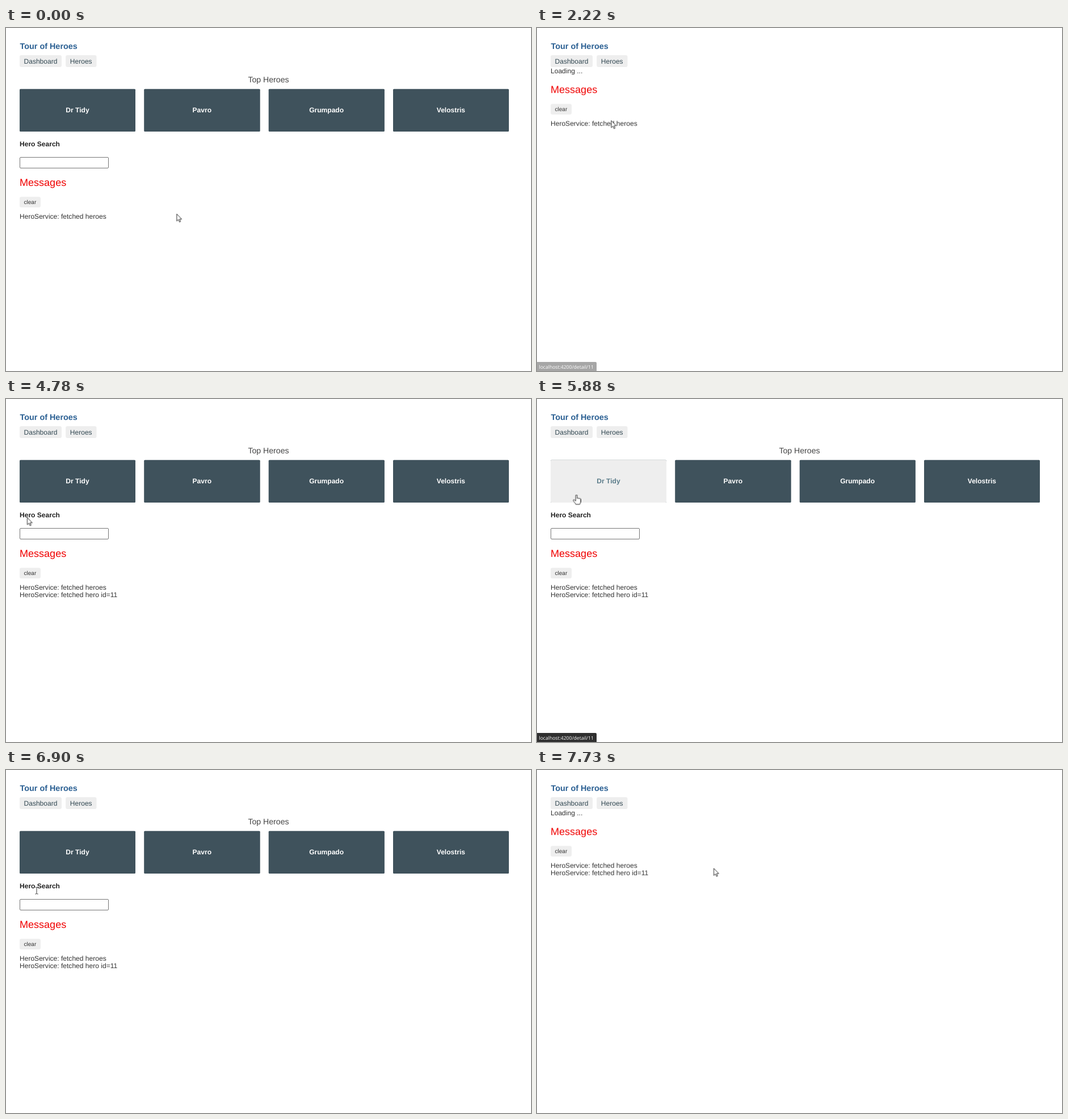
Animation, 925 px wide and 606 px high, one loop 8000 ms. Source, as an HTML page:

```html
<!DOCTYPE html>
<html lang="en">
<head>
<meta charset="utf-8">
<title>Tour of Heroes</title>
<style>
  html, body { margin: 0; width: 100%; height: 100%; overflow: hidden; background: #fff; }
  svg { display: block; width: 925px; height: 606px; }
  text { font: 12.05px "Liberation Sans", Arial, sans-serif; fill: #333; text-rendering: geometricPrecision; }
  .title { font-size: 14.4px; font-weight: bold; fill: #2b6093; }
  .nav text { fill: #334953; }
  .button { fill: #eee; }
  .small { font-size: 10.05px; }
  .bold { font-weight: bold; fill: #222; }
  .top { font-size: 14.1px; fill: #444; }
  .head { font-size: 18.05px; fill: #444; }
  .red { fill: #f00000; }
  .field { fill: #fff; stroke: #767676; }
  .cards { fill: #3f525c; }
  .cards text { font-weight: bold; fill: #fff; text-anchor: middle; }
  .cards .lit rect { fill: #eee; }
  .cards .lit text, .label { font-weight: bold; fill: #5b7c8a; }
  .status rect { fill: #2f2f2f; }
  .status text { font: 8.6px "Open Sans", "Noto Sans", sans-serif; fill: #fff; }
  .cursor path { fill: #fff; stroke: #111; stroke-width: .9; stroke-linejoin: round; }
  .cursor .beam { fill: none; stroke: #222; }

  /* Hard switches */
  .dash, .detail, .loading, .msgs, .second-msg, .first, .second, .arrow, .hand, .beam {
    animation: 8s step-end infinite;
  }
  .dash { animation-name: dash; }
  .detail { animation-name: detail; }
  .loading { animation-name: loading; }
  .msgs { animation-name: msgs; }
  .second-msg { animation-name: second-msg; }
  .first { animation-name: first; }
  .second { animation-name: second; }
  .arrow { animation-name: arrow; }
  .hand { animation-name: hand; }
  .beam { animation-name: beam; }

  /* Continuous motion */
  .status { animation: status 8s linear infinite; }
  .cursor { animation: cursor 8s ease-in-out infinite; }

  @keyframes dash {
    0%, 59.25%, 85.75% { opacity: 1; }
    22.75%, 74%, 93.75% { opacity: 0; }
  }
  @keyframes detail {
    0%, 59.25%, 85.75% { opacity: 0; }
    47.625%, 74% { opacity: 1; }
  }
  @keyframes loading {
    0%, 47.625% { opacity: 0; }
    22.75%, 93.75% { opacity: 1; }
  }
  @keyframes msgs {
    0%, 59.25%, 85.75% { transform: translateY(0); }
    22.75%, 93.75% { transform: translateY(-164.2px); }
    47.625%, 74% { transform: translateY(-24.8px); }
  }
  @keyframes second-msg {
    0% { opacity: 0; }
    47.625% { opacity: 1; }
  }
  @keyframes first {
    0%, 40%, 80% { opacity: 0; }
    14.3%, 67.55% { opacity: 1; }
  }
  @keyframes second {
    0% { opacity: 0; }
    91% { opacity: 1; }
  }
  @keyframes arrow {
    0%, 23.25%, 53.95%, 59.75%, 66.25%, 81.6%, 88.7%, 94.25% { opacity: 1; }
    14.3%, 47.625%, 55.1%, 64.6%, 67.55%, 82.9%, 91% { opacity: 0; }
  }
  @keyframes hand {
    0%, 23.25%, 59.75%, 74%, 85.75%, 94.25% { opacity: 0; }
    14.3%, 55.1%, 67.55%, 82.9%, 91% { opacity: 1; }
  }
  @keyframes beam {
    0%, 53.95%, 66.25%, 81.6%, 88.7% { opacity: 0; }
    47.625%, 64.6%, 74%, 85.75% { opacity: 1; }
  }
  @keyframes status {
    0%, 14.6%, 28.625%, 67.8%, 79.875%, 91.4%, 96.5%, 100% { opacity: 0; }
    16.25%, 26.625%, 69.7%, 77.875%, 92.6%, 95% { opacity: 1; }
  }
  @keyframes cursor {
    0%, 8.875% { transform: translate(300.8px, 328.5px); }
    16.25%, 52.125% { transform: translate(130.8px, 163.5px); }
    56.125%, 64.375% { transform: translate(37.5px, 209.5px); }
    69.75%, 79.875% { transform: translate(69.5px, 169.5px); }
    84.375%, 87.125% { transform: translate(54px, 213px); }
    93%, 100% { transform: translate(311.5px, 173.7px); }
  }
</style>
</head>
<body>
<svg viewBox="0 0 925 606">
  <text class="title" x="24.5" y="37">Tour of Heroes</text>
  <g class="nav">
    <rect class="button" x="24" y="48" width="74" height="21" rx="3"/>
    <rect class="button" x="105.2" y="48" width="54.3" height="21" rx="3"/>
    <text x="31.5" y="62.5">Dashboard</text>
    <text x="112.8" y="62.5">Heroes</text>
  </g>

  <g class="dash">
    <text class="top" x="462.5" y="96" text-anchor="middle">Top Heroes</text>
    <g class="cards">
      <rect x="24" y="107.8" width="204" height="75.2" rx="1.5"/>
      <rect x="243.2" y="107.8" width="204.5" height="75.2" rx="1.5"/>
      <rect x="462.7" y="107.8" width="204.2" height="75.2" rx="1.5"/>
      <rect x="682" y="107.8" width="204" height="75.2" rx="1.5"/>
      <text x="126" y="149">Dr Tidy</text>
      <text x="345.3" y="149">Pavro</text>
      <text x="564.6" y="149">Grumpado</text>
      <text x="783.9" y="149">Velostris</text>
      <g class="lit first">
        <rect x="24" y="107.8" width="204" height="75.2" rx="1.5"/>
        <text x="126" y="149">Dr Tidy</text>
      </g>
      <g class="lit second">
        <rect x="243.2" y="107.8" width="204.5" height="75.2" rx="1.5"/>
        <text x="345.3" y="149">Pavro</text>
      </g>
    </g>
    <text class="bold" x="24" y="208.5">Hero Search</text>
    <rect class="field" x="24.5" y="228.5" width="156" height="19" rx="1.5"/>
  </g>

  <g class="detail">
    <text class="head" x="24" y="101">DR TIDY Details</text>
    <text x="24" y="131">id: 11</text>
    <text class="label" x="24" y="150.5">name:</text>
    <rect class="field" x="24.5" y="153.5" width="155" height="28" rx="1"/>
    <g class="beam"><rect class="field" style="stroke:#3c3c3c" x="24.5" y="153.5" width="155" height="28" rx="1"/></g>
    <text x="30.3" y="171.7">Dr Tidy</text>
    <rect class="button" x="24" y="203.5" width="51" height="18.5" rx="3"/>
    <rect class="button" x="74.5" y="203.5" width="36" height="18.5" rx="3"/>
    <g class="hand"><rect fill="#cfd8dc" x="24" y="203.5" width="51" height="18.5" rx="3"/></g>
    <text class="small" x="31.5" y="216.2">go back</text>
    <text class="small" x="82" y="216.2">save</text>
  </g>

  <text class="loading" x="24" y="80">Loading ...</text>

  <g class="msgs">
    <text class="head red" x="24" y="278.7">Messages</text>
    <rect class="button" x="24" y="298.2" width="37" height="18.8" rx="3"/>
    <text class="small" x="31.5" y="311.2">clear</text>
    <text x="24" y="336.5">HeroService: fetched heroes</text>
    <text class="second-msg" x="24" y="350.1">HeroService: fetched hero id=11</text>
  </g>

  <g class="status">
    <rect x="-3" y="590" width="108" height="20" rx="2"/>
    <text x="3.5" y="601.5">localhost:4200/detail/11</text>
    <g class="second">
      <rect x="-3" y="590" width="108" height="20" rx="2"/>
      <text x="3.5" y="601.5">localhost:4200/detail/12</text>
    </g>
  </g>

  <g class="cursor">
    <path class="arrow" d="M0 0V12.6L2.9 9.9 4.8 14.3 6.8 13.4 4.9 9.2H8.8Z"/>
    <path class="hand" d="M-1.3 10.8V1a1.3 1.3 0 0 1 2.6 0V6.2c0-1 2.2-1 2.2.3 0-1 2.1-.9 2.1.4 0-1 1.8-.8 1.8.6V12c0 2-1.2 2.6-1.5 4.6H-1.2c-.3-2-3.8-4.6-4.4-6.8-.4-1.4 1.3-2 2.3-.8Z"/>
    <path class="beam" d="M-2.6-6H-.8L0-5.2.8-6H2.6M0-5.2V5.2M-2.6 6H-.8L0 5.2.8 6H2.6"/>
  </g>
</svg>
</body>
</html>
```
